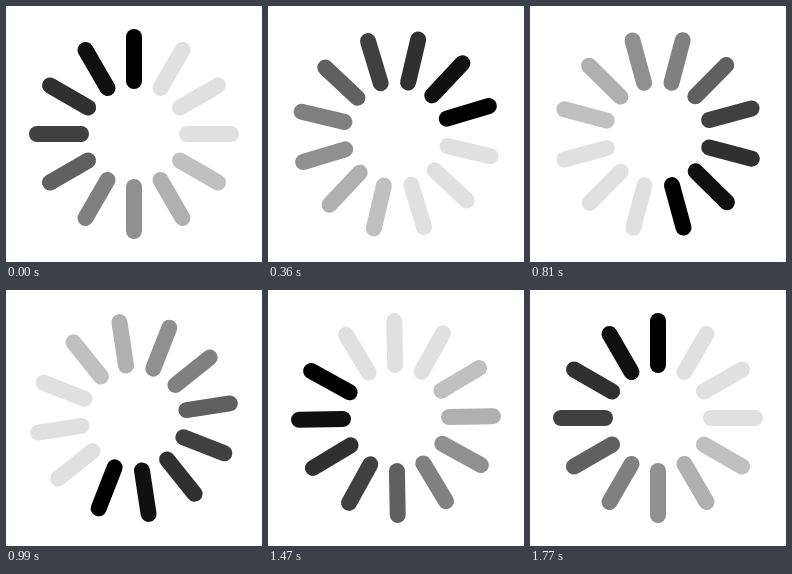
An HTML page with a canvas for the animation above (1800 ms loop, 256 by 256 pixels).

```html
<!DOCTYPE html>
<html lang="en">
<head>
<meta charset="utf-8">
<title>Spinner</title>
<style>
  html, body { margin: 0; width: 100%; height: 100%; overflow: hidden; background: #fff; }
  canvas { display: block; width: 256px; height: 256px; }
</style>
</head>
<body>
<canvas id="stage" width="256" height="256"></canvas>
<script>
const SIZE = 256;
const STEP = 30;    // ms per pose
const STEPS = 60;   // poses per turn, first and last both upright
const INNER = 53;
const OUTER = 97;
// Grey levels, clockwise from the leading bar
const GREYS = [0, 224, 224, 224, 192, 176, 144, 128, 96, 64, 48, 16];

const ctx = document.getElementById('stage').getContext('2d');

function drawBar(angle, grey) {
  const x = Math.sin(angle), y = -Math.cos(angle);
  ctx.strokeStyle = `rgb(${grey}, ${grey}, ${grey})`;
  ctx.beginPath();
  ctx.moveTo(x * INNER, y * INNER);
  ctx.lineTo(x * OUTER, y * OUTER);
  ctx.stroke();
}

function draw(time) {
  const step = Math.floor(time / STEP + 1e-3) % STEPS;
  const turn = step / (STEPS - 1);
  ctx.setTransform(1, 0, 0, 1, 0, 0);
  ctx.fillStyle = '#fff';
  ctx.fillRect(0, 0, SIZE, SIZE);
  ctx.translate(SIZE / 2, SIZE / 2);
  ctx.lineWidth = 16;
  ctx.lineCap = 'round';
  GREYS.forEach((grey, i) => drawBar((turn + i / GREYS.length) * Math.PI * 2, grey));
}

function tick() {
  draw(performance.now());
  requestAnimationFrame(tick);
}

draw(0);
requestAnimationFrame(tick);
</script>
</body>
</html>
```
